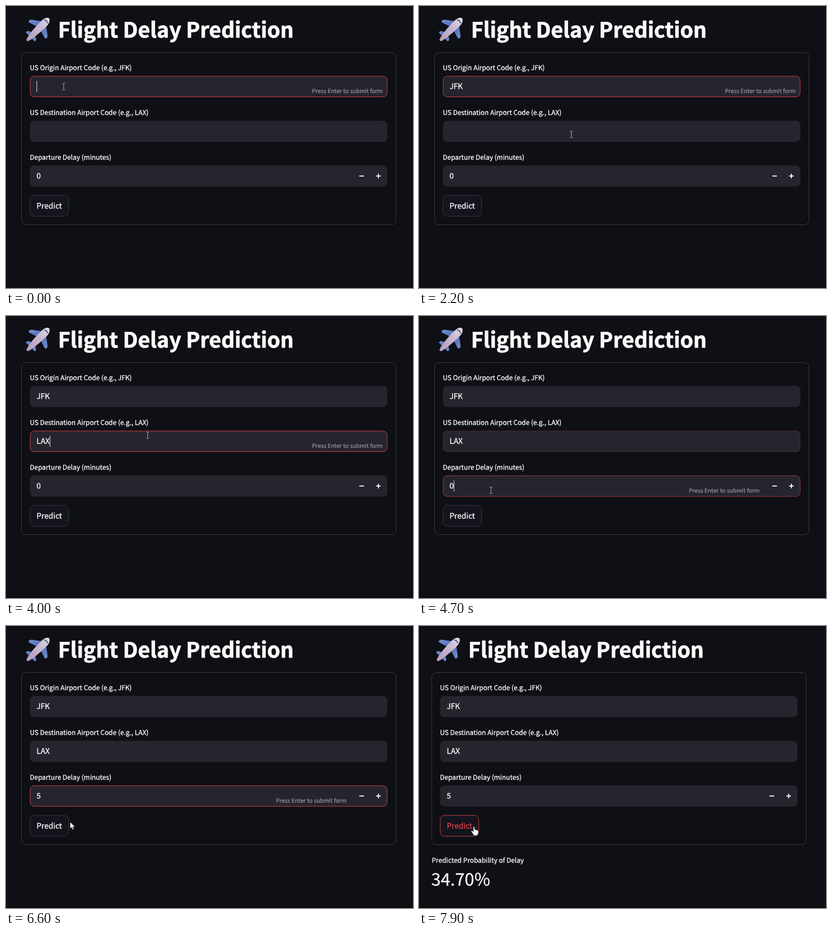
Recreate the animation shown at these times as an HTML page. Size 800x554 px, loop 8 s.

```html
<!DOCTYPE html>
<html lang="en">
<head>
<meta charset="utf-8">
<title>Flight Delay Prediction</title>
<style>
  html, body { margin: 0; width: 100%; height: 100%; overflow: hidden; background: #0e1015; }
  svg { display: block; width: 800px; height: 554px; }
  text {
    font-family: "Noto Sans CJK JP", "Noto Sans CJK SC", "Noto Sans CJK", "Noto Sans", sans-serif;
    font-size: 15px; color: #fafafa; fill: currentColor; stroke: currentColor; stroke-width: .35;
    text-rendering: geometricPrecision; white-space: pre;
  }
  .title { font-size: 41.3px; font-weight: 700; stroke-width: .9; }
  .label { font-size: 13.1px; }
  .hint { font-size: 11.24px; color: #9c9ca1; stroke-width: .2; text-anchor: end; }
  .metric { font-size: 33.9px; stroke-width: .3; }
  .box { fill: #26252e; }
  .ring { fill: none; stroke: #cf4048; }
  .icon { stroke: #fafafa; stroke-width: 2; fill: none; }
</style>
</head>
<body>
<svg viewBox="0 0 800 554">
  <defs>
    <linearGradient id="hull" x1="0" y1="1" x2="1" y2="0">
      <stop offset="0" stop-color="#b49ab8"/>
      <stop offset=".6" stop-color="#c9b9d2"/>
      <stop offset="1" stop-color="#e2dde8"/>
    </linearGradient>
    <linearGradient id="blue" x1="0" y1="0" x2="1" y2="1">
      <stop offset="0" stop-color="#758fd2"/>
      <stop offset="1" stop-color="#4a66b4"/>
    </linearGradient>
    <g id="wings" fill="url(#blue)">
      <path d="M44.5 30C45.5 27.5 48 26.5 51 27L71 30 62 41 46.5 33Q44 32 44.5 30Z"/>
      <path d="M39.5 51.5Q41 48.8 44 49.3L53 52 46 59 40.3 53.5Q39 52.5 39.5 51.5Z"/>
    </g>
  </defs>
  <rect width="800" height="554" fill="#0e1015"/>
  <rect y="552" width="800" height="2" fill="#0a0b0e"/>
  <g id="page">
    <use href="#wings"/>
    <use href="#wings" transform="matrix(0 -1 -1 0 108.5 108.5)"/>
    <path fill="url(#hull)" d="M40.5 66C42.5 59 59.5 38 71.5 27.5 76.5 23 83 22 84.7 24.3 87 27 85.5 33.5 81.5 38 70.5 49.5 50.5 66.5 44 68.8 42 69.4 40 68 40.5 66Z"/>
    <path d="M75.5 27.5Q80 28.5 81.5 33" fill="none" stroke="#4d5675" stroke-width="2.2" stroke-linecap="round"/>
    <text class="title" x="102.3" y="62">Flight Delay Prediction</text>
    <rect x="30.5" y="91.5" width="736" height="338" rx="8.4" fill="none" stroke="#3b3c42"/>
    <g id="fields"></g>
    <path class="icon" d="M694.5 334h9M727.5 334h9M732 329.5v9"/>
    <rect id="button" x="47.3" y="372" width="75.5" height="41" rx="8.4" fill="#13141d"/>
    <text id="predict" x="60" y="397.5">Predict</text>
    <g id="result">
      <text class="label" x="30.5" y="465">Predicted Probability of Delay</text>
      <text class="metric" x="29.5" y="510">34.70%</text>
    </g>
    <rect id="caret" width="1.1" height="22" fill="#dcdcde"/>
  </g>
  <path id="beam" d="M-2.5-6h2.2L.5-5.3 1.3-6H3.5M.5-5.5V6M-2.5 6.5h2.2L.5 5.8 1.3 6.5H3.5" fill="none" stroke="#b8b8bc"/>
  <path id="arrow" d="M0 0V13.2L3.1 10.4 5.2 15.2 7.4 14.2 5.3 9.6H9.6Z" fill="#fff" stroke="#111" stroke-width=".7"/>
  <path id="hand" d="M-1.3 1C-1.3-.5 1.3-.5 1.3 1V6C2 5.2 3.6 5.5 3.8 6.6 4.6 6 6 6.4 6.2 7.5 7.2 7 8.6 7.6 8.6 9V12C8.6 14.5 7 15.5 7 17.5H-.5C-.8 15-4.2 12.5-5.2 9.6-5.6 8-3.6 7.4-2.6 8.8L-1.3 10.4Z" fill="#fff" stroke="#111" stroke-width=".7"/>
</svg>
<script>
const LOOP = 8000, STEP = 100, BLINK = 530, FADE = 200;
const $ = id => document.getElementById(id);

const fields = [
  { label: "US Origin Airport Code (e.g., JFK)", y: 137.5, hintX: 740.5, on: -1000, off: 2500,
    typed: [[0, ""], [600, "J"], [900, "JF"], [1300, "JFK"]] },
  { label: "US Destination Airport Code (e.g., LAX)", y: 225.4, hintX: 740.5, on: 2500, off: 4600,
    typed: [[0, ""], [3100, "L"], [3500, "LA"], [3800, "LAX"]] },
  { label: "Departure Delay (minutes)", y: 313.3, hintX: 669.5, on: 4600, off: 7100,
    typed: [[0, "0"], [5100, ""], [5600, "5"]] }
];
const resultAt = 7500, shift = -5.5;

// time, x, y of the pointer's hot spot
const path = [
  [0, 113, 158], [1600, 113, 158], [2200, 299, 252], [2500, 299, 252],
  [2900, 289, 225], [3900, 289, 225], [4500, 141, 342], [5800, 141, 342],
  [6600, 125.5, 385], [6900, 108, 394], [LOOP, 108, 394]
];

function add(parent, tag, attrs, text = "") {
  const el = document.createElementNS("http://www.w3.org/2000/svg", tag);
  for (const key in attrs) el.setAttribute(key, attrs[key]);
  el.textContent = text;
  return parent.appendChild(el);
}

// rounded field frame, optionally inset
const frame = (y, d = 0) =>
  ({ x: 47 + d, y: y + d, width: 702.6 - 2 * d, height: 41.5 - 2 * d, rx: 8.4 - d });

for (const f of fields) {
  const root = $("fields"), top = Math.round(f.y - .1);
  add(root, "text", { class: "label", x: 46.7, y: top - 11.5 }, f.label);
  add(root, "rect", { class: "box", ...frame(f.y) });
  f.ring = add(root, "rect", { class: "ring", ...frame(f.y, .5) });
  f.value = add(root, "text", { x: 60, y: top + 26 });
  f.hint = add(root, "text", { class: "hint", x: f.hintX, y: top + 33.6 }, "Press Enter to submit form");
}

const clamp = v => Math.min(1, Math.max(0, v));
const show = (el, visible) => el.style.display = visible ? "" : "none";

function pointerAt(t) {
  const i = path.findIndex(p => p[0] > t);
  const [t0, x0, y0] = path[i - 1], [t1, x1, y1] = path[i];
  const k = (t - t0) / (t1 - t0), e = k * k * (3 - 2 * k);
  return [x0 + (x1 - x0) * e, y0 + (y1 - y0) * e].map(Math.round);
}

function drawField(f, t) {
  const focused = t >= f.on && t < f.off;
  const [since, text] = f.typed.filter(s => s[0] <= t).pop();
  f.value.textContent = text;
  f.ring.style.opacity = clamp((t - f.on + 50) / FADE) * clamp(1 - (t - f.off + 50) / FADE);
  show(f.hint, focused);
  if (!focused) return;
  const idle = t - Math.max(since, f.on, 0);
  const end = text ? f.value.getComputedTextLength() : 0;
  show($("caret"), Math.floor(idle / BLINK) % 2 === 0);
  $("caret").setAttribute("x", 60 + end);
  $("caret").setAttribute("y", f.y + 9.5);
}

function draw(t) {
  const done = t >= resultAt, dx = done ? shift : 0;
  $("page").setAttribute("transform", `translate(${dx} 0)`);
  show($("result"), done);
  show($("caret"), false);
  fields.forEach(f => drawField(f, t));

  const [x, y] = pointerAt(t);
  const inField = fields.some(f => y > f.y + 1 && y < f.y + 41);
  const onButton = x < 123 + dx && y > 372 && y < 413;
  const kind = onButton ? "hand" : inField ? "beam" : "arrow";
  for (const id of ["beam", "arrow", "hand"]) show($(id), id === kind);
  $(kind).setAttribute("transform", `translate(${x} ${y})`);
  $("button").setAttribute("stroke", onButton ? "#cf4048" : "#3b3c44");
  $("predict").style.color = onButton ? "#dc3e46" : "";
}

function tick() {
  const t = performance.now() % LOOP;
  draw(Math.floor(t / STEP) * STEP);
  requestAnimationFrame(tick);
}
tick();
</script>
</body>
</html>
```
